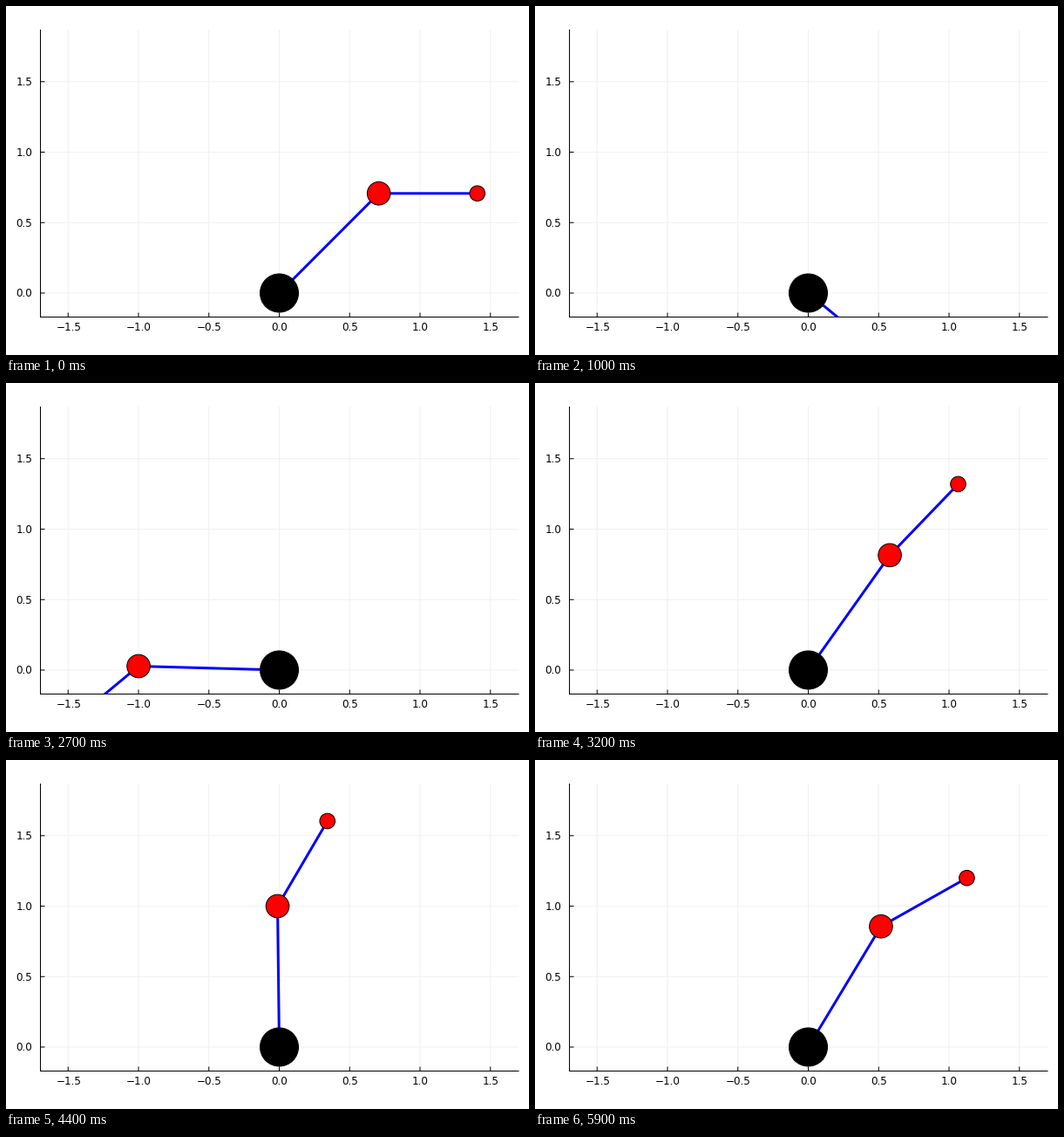
A matplotlib script that plays this animation: 600 px wide and 400 px high, repeating every 6 s.

```python
import numpy as np
import matplotlib.pyplot as plt
from matplotlib.animation import FuncAnimation
from matplotlib.patches import Circle, Rectangle

W, H, DPI = 600, 400, 100
PX = 72 / DPI                      # one pixel in points
ORIGIN = np.array([313.5, 329.0])
UNIT = 161.5
L1, L2 = 1.0, 0.7
LEFT, TOP, RIGHT, BOTTOM = 39.5, 27, 588.5, 356.5
STEPS = 60

# Key poses: step, upper angle, lower angle (degrees, unwrapped clockwise).
POSES = np.array([
    (10, -39.4, -79), (16, -201.8, -246.4), (19, -303.2, -278.1),
    (30, -602.4, -626.6), (32, -665.4, -673.9), (44, -989.3, -1020.4),
    (53, -1239, -1266), (58, -1367.6, -1395.1), (59, -1381.1, -1410.6),
])
START = np.array([45, 0])
REST, LAUNCHED = 2, 10             # the arm accelerates between these steps
GROWTH = 1.75
SWING, PERIOD, PHASE = 36, 7.0, 30.7


def swing(k):
    """The elbow bends back and forth, shared out over both links."""
    bend = -SWING * np.cos(2 * np.pi * (k - PHASE) / PERIOD)
    return np.array([-0.4 * bend, 0.6 * bend])


def launch(k):
    """Each step covers more time than the last; the lower link leads."""
    n = max(0, k - REST)
    v = (GROWTH ** n - 1) / (GROWTH ** (LAUNCHED - REST) - 1)
    return START + (POSES[0, 1:] - START) * [v, 1 - (1 - v) ** 2.4]


def angles(k):
    if k < LAUNCHED:
        return launch(k)
    keys = POSES[:, 0]
    turn = POSES[:, 1:].T - swing(keys)
    return swing(k) + [np.interp(k, keys, t) for t in turn]


def to_px(x, y):
    return ORIGIN + UNIT * np.array([x, -y])


def polar(length, deg):
    a = np.radians(deg)
    return length * np.array([np.cos(a), np.sin(a)])


fig = plt.figure(figsize=(W / DPI, H / DPI), dpi=DPI, facecolor="white")
ax = fig.add_axes([0, 0, 1, 1])
ax.set_xlim(0, W)
ax.set_ylim(H, 0)
ax.axis("off")


def rule(xs, ys, color="black", z=6):
    ax.plot(xs, ys, color=color, lw=PX, solid_capstyle="butt", zorder=z,
            snap=False)


def label(x, y, value, align):
    text = f"{value:.1f}".replace("-", "\u2212")
    ax.text(x, y + 4.4, text, ha=align, va="baseline", color="black",
            family="DejaVu Sans", fontsize=12 * PX)


for v in np.arange(-3, 4) / 2:
    x = to_px(v, 0)[0]
    rule([x, x], [TOP, BOTTOM], "#f0f0f0", 0)
    rule([x, x], [BOTTOM, BOTTOM - 5])
    label(x + 0.5, 368, v, "center")
for v in np.arange(4) / 2:
    y = to_px(0, v)[1]
    rule([LEFT, RIGHT], [y, y], "#f0f0f0", 0)
    rule([LEFT, LEFT + 5], [y, y])
    label(30.5, y, v, "right")
rule([LEFT, LEFT], [TOP, BOTTOM + 0.5])
rule([LEFT - 0.5, RIGHT], [BOTTOM, BOTTOM])

window = Rectangle((LEFT, TOP), RIGHT - LEFT, BOTTOM - TOP,
                   transform=ax.transData)


def ball(radius, color, z):
    c = Circle(ORIGIN, radius, fc=color, ec="black", lw=PX, zorder=z)
    ax.add_patch(c)
    c.set_clip_path(window)
    return c


arm, = ax.plot([], [], color="#0000ff", lw=3 * PX, zorder=2,
               solid_joinstyle="round", solid_capstyle="butt")
arm.set_clip_path(window)
base = ball(22, "black", 3)
elbow = ball(13.3, "red", 4)
tip = ball(8.8, "red", 5)


def update(k):
    upper, lower = angles(k)
    p1 = polar(L1, upper)
    p2 = p1 + polar(L2, lower)
    a, b = to_px(*p1), to_px(*p2)
    arm.set_data(*zip(ORIGIN, a, b))
    elbow.center = tuple(a)
    tip.center = tuple(b)
    return arm, elbow, tip


anim = FuncAnimation(fig, update, frames=STEPS, interval=100,
                     repeat=True, repeat_delay=0, blit=False)
plt.show()
```
